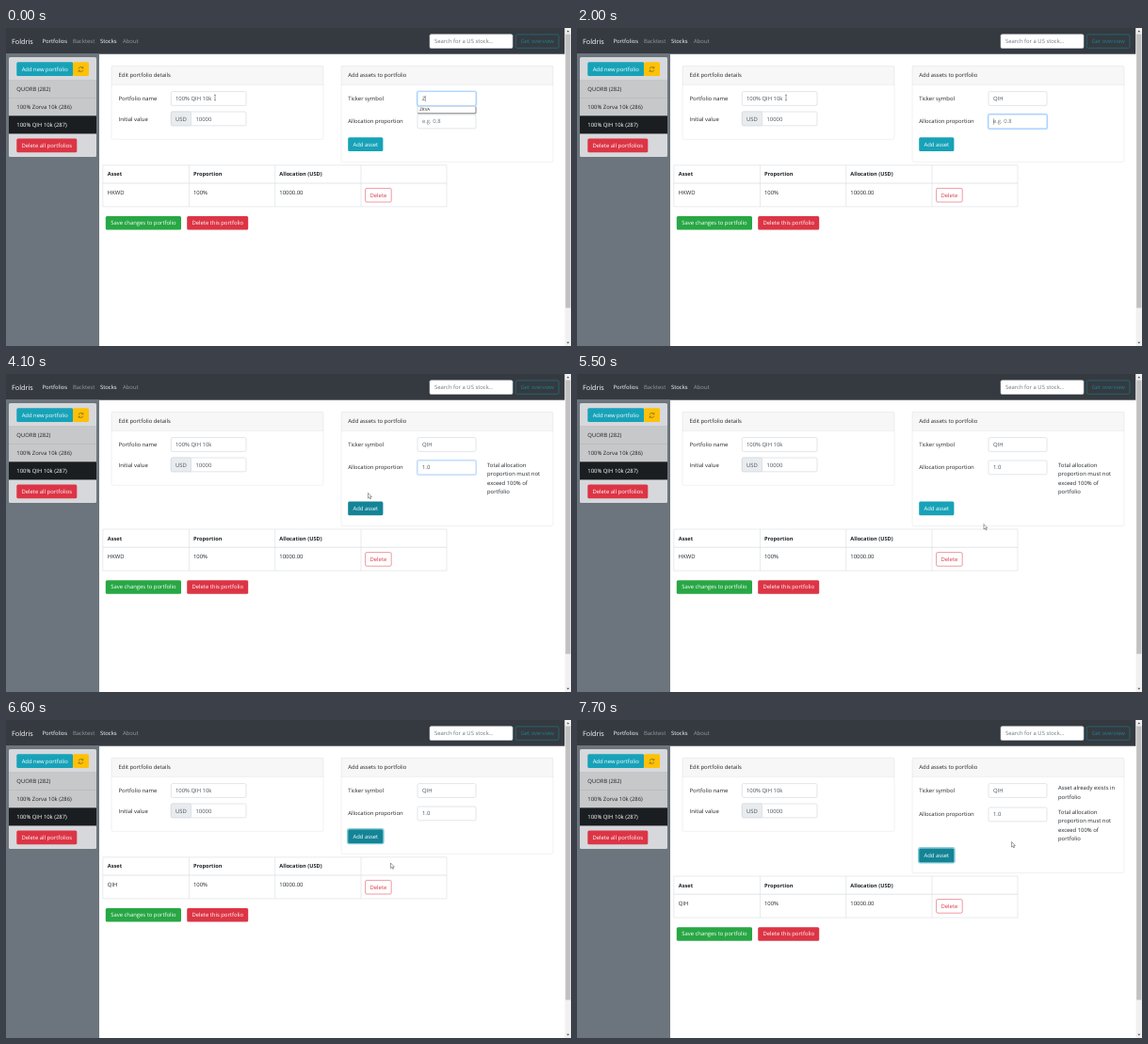
Recreate the animation shown at these times as an HTML page. Size 600 by 338 pixels, loop 8 s.

```html
<!DOCTYPE html>
<html lang="en">
<head>
<meta charset="utf-8">
<title>Portfolio editor</title>
<style>
  html, body { margin: 0; width: 100%; height: 100%; overflow: hidden; background: #fff; }
  svg { display: block; width: 100vw; height: 100vh; }
  text { font: 5.9px "Open Sans", "Noto Sans", sans-serif; fill: #212529; text-rendering: geometricPrecision; transform: translateY(-.3px); }
  .brand { font-size: 7.3px; fill: #fff; }
  .on { fill: #fff; }
  .off { fill: #999c9f; }
  .value { fill: #495057; }
  .hint { fill: #6c757d; }
  .mid { text-anchor: middle; }
  .bold text { font-weight: 700; font-size: 5.65px; }
  .warn { fill: #856404; font-size: 5.97px; }
  .card { fill: #fff; stroke: #000; stroke-opacity: .11; stroke-width: .5; }
  .input { fill: #fff; stroke: #ced4da; stroke-width: .6; }
  .addon { fill: #e9ecef; stroke: #ced4da; stroke-width: .6; }
  .lines { fill: none; stroke: #dee2e6; stroke-width: .7; }
  .info { fill: #17a2b8; }
  .danger { fill: #dc3545; }
  .success { fill: #28a745; }
</style>
</head>
<body>
<svg viewBox="0 0 600 338" preserveAspectRatio="none">
  <rect width="600" height="338" fill="#fff"/>

  <!-- navigation -->
  <rect width="593.5" height="27.7" fill="#343a40"/>
  <text class="brand" x="6" y="17">Foldris</text>
  <text class="on" x="38.5" y="16.6">Portfolios</text>
  <text class="off" x="71" y="16.6">Backtest</text>
  <text class="on" x="100" y="16.6">Stocks</text>
  <text class="off" x="124" y="16.6">About</text>
  <rect class="input" x="450" y="6.7" width="88" height="14.8" rx="1.5"/>
  <text class="hint" x="455" y="16.4">Search for a US stock...</text>
  <g opacity=".65">
    <rect x="541.3" y="6.9" width="45.7" height="14.4" rx="1.5" fill="none" stroke="#17a2b8" stroke-width=".6"/>
    <text class="mid" x="564.2" y="16.4" style="fill:#17a2b8">Get overview</text>
  </g>

  <!-- sidebar -->
  <rect y="27.7" width="99" height="311" fill="#6c757d"/>
  <rect x="3" y="31" width="93" height="106" rx="1.5" fill="#d6d8db"/>
  <rect class="info" x="11.3" y="36.3" width="60" height="14.8" rx="1.5"/>
  <text class="on mid" x="41.2" y="46">Add new portfolio</text>
  <rect x="71" y="36.3" width="17" height="14.8" rx="1.5" fill="#ffc107"/>
  <g fill="none" stroke="#4a4426" stroke-width=".5">
    <path d="M77.2 43.3a2.3 2.3 0 0 1 4.2-.9m.5-1.5v1.8h-1.8M81.8 44.5a2.3 2.3 0 0 1-4.2.9m-.5 1.5v-1.8h1.8"/>
  </g>
  <rect x="3" y="55.6" width="93" height="38" fill="#c6c8ca"/>
  <path d="M3 55.6H96M3 74.5H96" stroke="#000" stroke-opacity=".13" stroke-width=".5"/>
  <rect x="3" y="93.3" width="93" height="19.1" fill="#1b1e21"/>
  <text x="11.3" y="67.6">QUORB (282)</text>
  <text x="11.3" y="86.6">100% Zorva 10k (286)</text>
  <text class="on" x="11.3" y="105.5">100% QIH 10k (287)</text>
  <rect class="danger" x="11.3" y="117.6" width="64" height="14.6" rx="1.5"/>
  <text class="on mid" x="43.3" y="127.2">Delete all portfolios</text>

  <!-- portfolio details -->
  <rect class="card" x="112" y="40.3" width="225" height="78" rx="1.5"/>
  <path d="M112 40.3h225v20h-225z" opacity=".03"/>
  <path d="M112 60.3h225" stroke="#000" stroke-opacity=".11" stroke-width=".5"/>
  <text x="119.5" y="52.6">Edit portfolio details</text>
  <text x="119.5" y="77.5">Portfolio name</text>
  <rect class="input" x="175.3" y="67.6" width="79.7" height="14.8" rx="1.5"/>
  <text class="value" x="180" y="77.5">100% QIH 10k</text>
  <text x="119.5" y="98.9">Initial value</text>
  <rect class="input" x="175.3" y="89" width="79.7" height="14.8" rx="1.5"/>
  <rect class="addon" x="175.3" y="89" width="21.2" height="14.8" rx="1.5"/>
  <text class="value" x="180" y="98.9">USD</text>
  <text class="value" x="201.5" y="98.9">10000</text>

  <!-- asset form -->
  <rect class="card" id="formCard" x="356" y="40.3" width="225" height="102" rx="1.5"/>
  <path d="M356 40.3h225v20h-225z" opacity=".03"/>
  <path d="M356 60.3h225" stroke="#000" stroke-opacity=".11" stroke-width=".5"/>
  <text x="363.3" y="52.6">Add assets to portfolio</text>
  <text x="363.3" y="77.5">Ticker symbol</text>
  <rect id="tickerRing" x="436.4" y="67" width="63.2" height="16" rx="2" fill="none" stroke="#007bff" stroke-opacity=".25" stroke-width="1.2"/>
  <rect class="input" id="tickerBox" x="437" y="67.6" width="62" height="14.8" rx="1.5"/>
  <text class="value" id="ticker" x="442" y="77.5"></text>
  <g id="exists">
    <text x="511" y="74.8">Asset already exists in</text>
    <text x="511" y="84.2">portfolio</text>
  </g>
  <g id="allocRow">
    <text x="363.3" y="101.7">Allocation proportion</text>
    <rect id="allocRing" x="436.4" y="91.4" width="63.2" height="16" rx="2" fill="none" stroke="#007bff" stroke-opacity=".25" stroke-width="1.2"/>
    <rect class="input" id="allocBox" x="437" y="92" width="62" height="14.8" rx="1.5"/>
    <text class="hint" id="allocHint" x="442" y="101.7">e.g. 0.8</text>
    <text class="value" id="alloc" x="442" y="101.7"></text>
    <g id="exceeds">
      <text x="511" y="99.4">Total allocation</text>
      <text x="511" y="108.8">proportion must not</text>
      <text x="511" y="118.2">exceed 100% of</text>
      <text x="511" y="127.6">portfolio</text>
    </g>
  </g>
  <rect id="caret" width=".4" height="6.6" fill="#444"/>
  <g id="suggestion">
    <rect x="437" y="83.2" width="62" height="7.6" fill="#fff" stroke="#aaa" stroke-width=".4"/>
    <path d="M499 84V90.8H437" fill="none" stroke="#666" stroke-width=".7"/>
    <text id="suggested" x="439.3" y="88.7" style="font-size:4.5px"></text>
  </g>
  <g id="addButton">
    <rect id="addRing" x="362.6" y="115.6" width="38.4" height="16" rx="2" fill="none" stroke="#3ab0c3" stroke-opacity=".6" stroke-width="1.4"/>
    <rect id="addBox" x="363.2" y="116.2" width="37.2" height="14.8" rx="1.5"/>
    <text class="on mid" x="381.8" y="126">Add asset</text>
  </g>

  <!-- holdings -->
  <g id="holdings">
    <path class="lines" d="M102.8 145.8H468M102.8 145.8v19.3M194.5 145.8v19.3M285.7 145.8v19.3M377 145.8v19.3M468 145.8v19.3"/>
    <path class="lines" d="M102.8 165H468" style="stroke-width:.9"/>
    <g class="bold">
      <text x="107.8" y="157.7">Asset</text>
      <text x="199" y="157.7">Proportion</text>
      <text x="290.3" y="157.7">Allocation (USD)</text>
    </g>
    <g id="row">
      <path class="lines" d="M102.8 165v24.9H468V165M194.5 165v24.9M285.7 165v24.9M377 165v24.9"/>
      <text id="asset" x="107.8" y="177.4"></text>
      <text x="199" y="177.4">100%</text>
      <text x="290.3" y="177.4">10000.00</text>
      <rect id="deleteBox" x="381.6" y="170.4" width="27.6" height="14.6" rx="1.5" stroke="#dc3545" stroke-width=".5"/>
      <text class="mid" id="deleteText" x="395.4" y="180">Delete</text>
    </g>
    <g id="actions">
      <g id="save">
        <rect class="success" x="105.8" y="200" width="80.2" height="14.6" rx="1.5"/>
        <text class="on mid" x="145.9" y="209.6">Save changes to portfolio</text>
      </g>
      <rect class="danger" x="192.2" y="200" width="65" height="14.6" rx="1.5"/>
      <text class="on mid" x="224.7" y="209.6">Delete this portfolio</text>
      <g id="alert">
        <rect x="106" y="220.8" width="332" height="19.4" rx="1.5" fill="#fff3cd" stroke="#ffeeba" stroke-width=".5"/>
        <text class="warn" x="113.6" y="232.7">Total portfolio allocation must be exactly 100%. Adjust assets to reach 100% total allocation before saving changes.</text>
      </g>
    </g>
  </g>

  <!-- scrollbar -->
  <rect x="593.5" width="6.5" height="338" fill="#f1f1f1"/>
  <rect x="594.2" y="6.5" width="5.2" height="291" fill="#c1c1c1"/>
  <path d="M595.3 4.2l1.5-1.8 1.5 1.8zM595.3 333.8l1.5 1.8 1.5-1.8z" fill="#505050"/>

  <path id="beam" d="M-1-2.8H1M-1 2.8H1M0-2.8V2.8" fill="none" stroke="#333" stroke-width=".45"/>
  <path id="arrow" d="M0 0V5.6L1.3 4.4 2.2 6.4 3.1 6 2.2 4.1H3.9z" fill="#fff" stroke="#333" stroke-width=".45"/>
</svg>
<script>
  const LOOP = 8000, FADE = 150;
  const TAB = 950, BLUR = 4040, REMOVE = 5930, ADD = 6490, ADD_AGAIN = 7290;
  const ui = Object.fromEntries([...document.querySelectorAll('[id]')].map(el => [el.id, el]));

  const tickerSteps = [[0, 'Z'], [100, ''], [300, 'Q'], [500, 'QI'], [600, 'QIH']];
  const allocSteps = [[0, ''], [2450, '1'], [2530, '1.'], [2600, '1.0']];
  const suggestSteps = [[0, 'ZRVA'], [100, ''], [300, 'QIH'], [700, '']];
  const caretSteps = [[0, 1], [1480, 0], [2000, 1], [3100, 0], [3600, 1], [BLUR, 0]];
  const addDark = [[0, 0], [3800, 1], [4250, 0], [4750, 1], [5150, 0], [6350, 1]];
  const deleteHover = [[0, 0], [5700, 1], [REMOVE, 0]];
  const tickerFocus = [[0, 1], [TAB, 0]];
  const allocFocus = [[0, 0], [TAB, 1], [BLUR, 0]];
  const addFocus = [[0, 0], [ADD - 80, 1]];
  const pointer = [
    [3350, 222, 74], [3900, 384, 124], [4050, 384.5, 126.5], [4250, 384.5, 126.5], [4450, 384.5, 130.5],
    [4700, 385, 131], [5000, 390, 143], [5300, 438, 149], [5400, 438, 149], [5500, 432, 159.5],
    [5800, 395, 193], [5950, 395, 193], [6100, 398.5, 177], [6350, 386, 146], [6480, 385, 143],
    [6600, 408.5, 152], [6800, 408.5, 152], [7150, 384, 125], [7320, 384, 125], [7650, 461.5, 129.5]
  ];

  const smooth = u => u * u * (3 - 2 * u);
  const mix = (a, b, u) => a + (b - a) * u;
  const rgb = (a, b, u) => `rgb(${a.map((v, i) => Math.round(mix(v, b[i], u)))})`;
  const at = (steps, t) => steps.findLast(s => s[0] <= t)[1];

  // Level of a 0/1 switch, eased after each change.
  function fade(steps, t) {
    const i = steps.findLastIndex(s => s[0] <= t);
    if (!i) return steps[0][1];
    return mix(steps[i - 1][1], steps[i][1], smooth(Math.min(1, (t - steps[i][0]) / FADE)));
  }

  function pointerAt(t) {
    const i = pointer.findIndex(p => p[0] > t);
    if (i < 0) return pointer.at(-1).slice(1);
    if (!i) return pointer[0].slice(1);
    const [a, b] = [pointer[i - 1], pointer[i]], u = smooth((t - a[0]) / (b[0] - a[0]));
    return [mix(a[1], b[1], u), mix(a[2], b[2], u)];
  }

  const show = (el, visible) => el.style.display = visible ? '' : 'none';
  const move = (el, x, y) => el.setAttribute('transform', `translate(${x} ${y})`);

  function focusField(name, level) {
    ui[name + 'Ring'].style.opacity = level;
    ui[name + 'Box'].style.stroke = rgb([206, 212, 218], [128, 189, 255], level);
  }

  function draw(t) {
    const repeated = t >= ADD_AGAIN, exceeds = t >= BLUR && t < ADD || repeated;
    const hasRow = t < REMOVE || t >= ADD, nudge = repeated ? 1 : 0;
    const shift = exceeds ? 19.2 + nudge : 0;

    ui.ticker.textContent = at(tickerSteps, t);
    ui.alloc.textContent = at(allocSteps, t);
    show(ui.allocHint, !ui.alloc.textContent);
    ui.suggested.textContent = at(suggestSteps, t);
    show(ui.suggestion, ui.suggested.textContent);
    focusField('ticker', fade(tickerFocus, t));
    focusField('alloc', fade(allocFocus, t));

    const field = t < TAB ? ui.ticker : ui.alloc;
    const width = field.textContent ? field.getComputedTextLength() : 0;
    show(ui.caret, at(caretSteps, t));
    move(ui.caret, 442 + width, t < TAB ? 71.7 : 96.1);

    show(ui.exists, repeated);
    show(ui.exceeds, exceeds);
    move(ui.allocRow, 0, nudge);
    ui.formCard.setAttribute('height', 102 + shift);
    move(ui.addButton, 0, shift);
    ui.addBox.style.fill = rgb([23, 162, 184], [19, 132, 150], fade(addDark, t));
    ui.addRing.style.opacity = fade(addFocus, t);

    move(ui.holdings, 0, shift);
    show(ui.row, hasRow);
    ui.asset.textContent = t < REMOVE ? 'HKWD' : 'QIH';
    const hover = fade(deleteHover, t);
    ui.deleteBox.style.fill = rgb([255, 255, 255], [220, 53, 69], hover);
    ui.deleteText.style.fill = rgb([220, 53, 69], [255, 255, 255], hover);
    move(ui.actions, 0, hasRow ? 0 : -24.9);
    ui.save.style.opacity = hasRow ? 1 : .65;
    show(ui.alert, !hasRow);

    const [x, y] = pointerAt(t), overText = t < 3500;
    show(ui.beam, overText);
    show(ui.arrow, !overText);
    move(overText ? ui.beam : ui.arrow, x, y);
  }

  const start = performance.now();
  function frame() {
    draw((performance.now() - start) % LOOP);
    requestAnimationFrame(frame);
  }
  frame();
</script>
</body>
</html>
```
